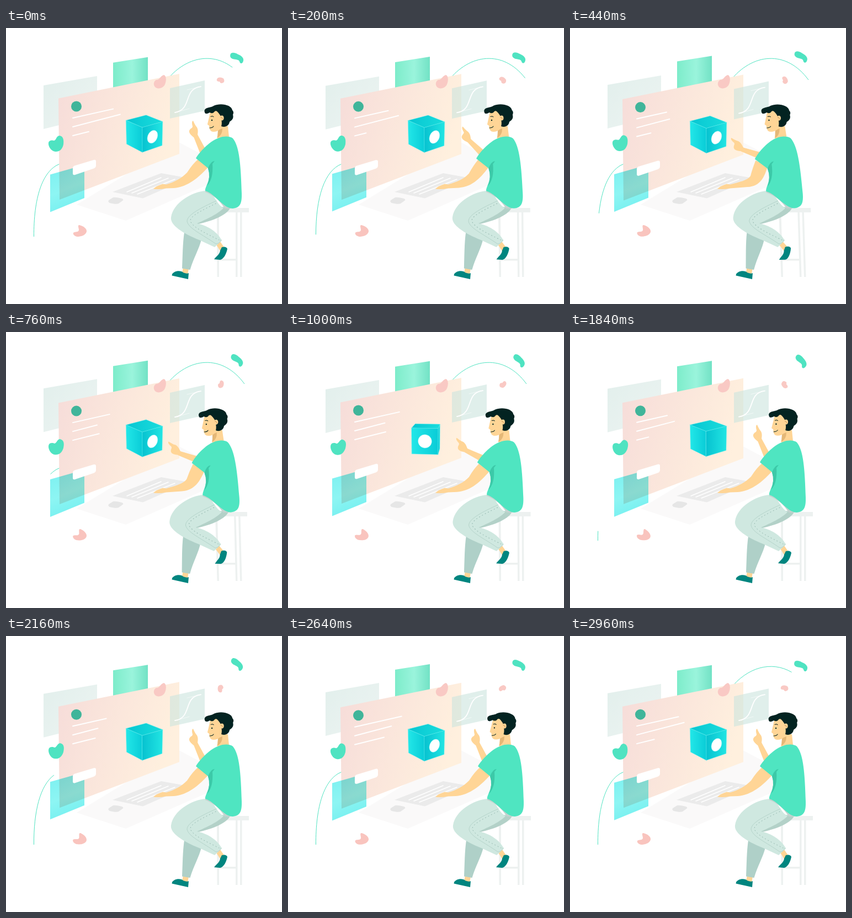
Animation, 500 px wide and 500 px high, one loop 3000 ms. Source, as an HTML page:

```html
<!DOCTYPE html>
<html lang="en">
<head>
<meta charset="utf-8">
<title>Pointing at a cube</title>
<style>
  html, body { margin: 0; height: 100%; overflow: hidden; background: #fff; }
  svg { display: block; width: 100vw; height: 100vh; }
</style>
</head>
<body>
<svg viewBox="0 0 500 500" fill="none" stroke-linecap="round" stroke-linejoin="round">
  <defs>
    <linearGradient id="gScreen" x2="1" y2=".3"><stop stop-color="#f6dcd9"/><stop offset="1" stop-color="#fff0de"/></linearGradient>
    <linearGradient id="gGreen"><stop stop-color="#7decca"/><stop offset=".55" stop-color="#9af4dc"/><stop offset="1" stop-color="#72e2c5"/></linearGradient>
    <linearGradient id="gPale" x2="1" y2="1"><stop stop-color="#e2efec"/><stop offset="1" stop-color="#edf4f2"/></linearGradient>
    <linearGradient id="gBlue" x2=".3" y2="1"><stop stop-color="#7af0f0"/><stop offset=".6" stop-color="#8df5f3"/><stop offset="1" stop-color="#78f0f0"/></linearGradient>
    <linearGradient id="gLeft"><stop stop-color="#22e7e8"/><stop offset="1" stop-color="#0accd7"/></linearGradient>
    <linearGradient id="gRight"><stop stop-color="#07c2d0"/><stop offset="1" stop-color="#22e5e3"/></linearGradient>
    <linearGradient id="gTop"><stop stop-color="#06c6d2"/><stop offset="1" stop-color="#1adcdc"/></linearGradient>
  </defs>

  <!-- desk -->
  <path fill="#faf9f9" d="M128 320 217 349 372 281V238L313 207Z"/>
  <path fill="#ebebeb" d="M193 297 281 263 331 272 248 308.500Z"/>
  <path stroke="#fff" stroke-width="1.500" d="M219 297 281 271M228 299 294 272M238 301 306 274"/>
  <path fill="#e6e6e6" d="M186 312 194 307Q198 306 210 309 214 311 211 313L204 318Q200 320 188 317 184 315 186 312Z"/>

  <path id="arcTop" pathLength="1" stroke="#4fe3c1" stroke-linecap="butt" d="M290 96C330 45 392 39 432 94"/>
  <path id="arcLeft" pathLength="1" stroke="#4fe3c1" stroke-linecap="butt" d="M50.500 378C50 310 65 258 98 246"/>

  <!-- floating panels -->
  <path id="pale" fill="url(#gPale)" d="M68 104 165 87V159L68 183Z"/>
  <path id="green" fill="url(#gGreen)" d="M194 62.500 257 52.500V112H194Z"/>
  <g id="screen">
    <path fill="url(#gScreen)" d="M95 127.500 314 83V228L97 311Z"/>
    <circle cx="127.500" cy="142" r="9.500" fill="#40b59a"/>
    <path id="lines" stroke="#fff" stroke-width="2"/>
  </g>
  <path id="blue" fill="url(#gBlue)" style="mix-blend-mode:multiply" d="M80 265.500 142 248V308L80 333.500Z"/>
  <path id="button" fill="#fff" d="M124 249.500 159 239Q163 238 163 242V249Q163 253 159 254.500L125 266Q121 267 121 263V254Q121 250.500 124 249.500Z"/>
  <g id="graph">
    <path fill="#cde5df" opacity=".62" d="M297 109 360 95V150L297 164Z"/>
    <path stroke="#fff" stroke-width="1.800" d="M306 153C338 148 320 110 353 106"/>
    <path stroke="#fff" stroke-width=".7" opacity=".8" d="M306 153 332 146M328 112 353 106"/>
  </g>
  <g id="cube" stroke="#63eeee" stroke-width=".5"></g>

  <!-- blobs -->
  <path fill="#f9c9c4" d="M286 85C291 87 291 97 287 104 283 110 274 111 270 107 266 102 268 96 272 94 279 94 279 87 286 85Z"/>
  <path id="bean" fill="#4fe3c1" d="M406.500 48C408 43 415 44.500 420 47.500 426 50 431 54 430 59 429 65.500 424 65.500 423 61 422 57 416 57.500 411 56 407 54 405.500 52 406.500 48Z"/>
  <path id="petal" fill="#f9c9c4" d="M382 93C383 88.500 390 88.500 394 91.500 397 96 395 100 390 100 387 99.500 388 97 386 97 383 97 381 95 382 93Z"/>
  <path id="heart" fill="#4fe3c1" d="M97 195C104 196 105 203 104 211 102 220 97 224 90 224 82 224 76 214 77 208 78 203 84 203 87 204 91 204 91 195 97 195Z"/>
  <path id="shell" fill="#f9c4be" d="M133 357C141 359 147 364 146 369 144 376 135 378 129 378 123 377 121 373 122 371 125 368 131 371 132 366 132 362 129 357 133 357Z"/>

  <!-- stool and legs -->
  <g id="lower">
    <path fill="#edf1f0" d="M382 326H440V334H427.500V451H424V334H419.500V451H416V421.500H386V451H382.500ZM386 334V418H416V334Z"/>
    <path fill="#ffd596" d="M321 434 331 436 329 447 319 444Z"/>
    <path fill="#afd0c8" d="M323 370 354 383C350 400 340 416 333.500 438L319 435.500C320 415 320 390 323 370Z"/>
    <g id="foot">
      <path fill="#ffd596" d="M380 391 388 387 395 397 388 404Z"/>
      <path fill="#00857f" d="M391 397Q399 395 401 400C399 410 394 419 388 420L377 419C381 413 387 411 388 403Z"/>
    </g>
    <path fill="#b3d1c8" d="M342 356C368 352 400 340 406 326L376 322Z"/>
    <path fill="#cfe8e0" d="M361 295C337 297 303 316 299 343 297 357 320 372 350 384L378 397 391 385C383 368 362 357 346 354 362 347 386 336 394 326 385 322 377 305 371 297Z"/>
    <path stroke="#a9cbc1" stroke-width=".7" d="M381 313C355 325 328 338 328 350 330 363 356 374 380 391 385 391 389 387 390 384"/>
    <path stroke="#8fb3aa" stroke-width="1" stroke-dasharray="1 5" d="M380 318C358 329 334 340 334 349 336 360 362 372 386 384"/>
  </g>
  <path fill="#00857f" d="M301 446C305 439 318 439 321 443Q328 446 331 444L330 455 300.500 448.500Z"/>

  <path id="restArm" fill="#ffd596"/>
  <g id="torso">
    <g id="raisedArm" fill="#ffd596">
      <path d="M339 195 347 193 366 228 356 238Z"/>
      <path id="hand" d="M339 168C341 172 343 177 346 180 349 186 347 191 347 195L340 198C335 194 331 190 332 186 334 181 338 182 338 178 337 174 336 169 339 168Z"/>
    </g>
    <path fill="#ffd596" d="M384 178H402L404 198Q393 205 382 199 385 192 384 178Z"/>
    <path fill="#e5b877" d="M384 185 392 182Q392 194 383 199Z"/>
    <g id="head">
      <path fill="#ffd596" d="M370 151C368 161 367 166 365 174 365 176 368 176 368 177 368 183 370 188 376 188 385 188 390 182 393 175L396 155 380 146Z"/>
      <path fill="#032321" d="M360 153C357 143 371 145 376 141 388 135 409 139 410 149 413 152 412 155 411 157 413 164 409 167 405 170 404 177 397 181 390 178 392 171 390 165 388 158 383 151 381 149 378 151 375 156 371 154 369 153 364 156 361 156 360 153Z"/>
      <ellipse cx="391" cy="163" rx="3.600" ry="4.500" fill="#ffd596"/>
      <path stroke="#b98546" stroke-width=".8" d="M389 162Q392 161 392 165"/>
      <circle cx="373" cy="167" r="1.200" fill="#032321"/>
      <path stroke="#032321" stroke-width="1" d="M371 160.500Q374 159 376 161M369 181Q374 181 376 178"/>
    </g>
    <path fill="#c3d3cf" d="M361 294 371 296 408 327 396 327Q384 306 361 297Z"/>
    <path fill="#4fe5c1" d="M386 199C394 195 407 196 411 200 423 214 425.500 250 427 300 427.500 318 424 326 410 327 393 326 380 301 361 295 360 288 370 278 368 262L366 254 344 236C352 222 372 203 386 199Z"/>
    <path fill="#3cc9a8" d="M366 254Q371 270 364 286 376 274 374 246L378 241Q371 241 366 254Z"/>
  </g>
</svg>
<script>
const LOOP = 3000, STEP = 40, TAU = 2 * Math.PI;
const el = id => document.getElementById(id);
const clamp = v => Math.min(1, Math.max(0, v));
const ease = v => v < .5 ? 2 * v * v : 1 - 2 * (1 - v) ** 2;
const span = (t, from, to) => clamp((t - from) / (to - from));
const wave = (t, period, peak) => Math.cos(TAU * (t - peak) / period);
const mix = (a, b, k) => a + (b - a) * k;
const move = (id, value) => el(id).setAttribute('transform', value);
const lift = (id, y) => move(id, `translate(0 ${y})`);
const spin = (id, deg, x, y, dy = 0) => move(id, `translate(0 ${dy}) rotate(${deg} ${x} ${y})`);

function trim(id, a, b) {
  el(id).setAttribute('visibility', b - a > .002 ? 'visible' : 'hidden');
  el(id).setAttribute('stroke-dasharray', `0 ${a} ${b - a} 2`);
}

function drawCube(t, dy) {
  const turns = [[760, 1240], [1500, 1820], [1820, 2140], [2200, 2620]].map(([a, b]) => span(t, a, b));
  const yaw = (39 - 90 * turns.reduce((sum, k) => sum + ease(k), 0)) * TAU / 360;
  const dip = Math.max(...turns.map(k => Math.sin(Math.PI * k)));
  const half = 23.2, sin = mix(.37, .2, dip), cos = Math.sqrt(1 - sin * sin);
  const cy = 190.2 + 3 * dip + dy;
  const project = (x, y, z) => {
    const k = 600 / (600 - z * cos - y * sin);
    return `${(250.5 + x * k).toFixed(2)},${(cy + (z * sin - y * cos) * k).toFixed(2)}`;
  };
  // point on the side whose normal points to azimuth a
  const onSide = (a, u, v) => project(
    half * Math.sin(a) + u * Math.cos(a), v, half * Math.cos(a) - u * Math.sin(a));
  const poly = (points, fill) => `<polygon points="${points.join(' ')}" fill="${fill}"/>`;
  const sides = [0, 1, 2, 3].map(i => yaw + i * TAU / 4);
  let out = poly(sides.map(a => onSide(a, half, half)), 'url(#gTop)');
  sides.forEach((a, i) => {
    if (Math.cos(a) < .045) return;
    const corners = [[-1, 1], [1, 1], [1, -1], [-1, -1]].map(([u, v]) => onSide(a, u * half, v * half));
    out += poly(corners, Math.sin(a) < 0 ? 'url(#gLeft)' : 'url(#gRight)');
    if (i) return;
    const disc = Array.from({ length: 40 }, (_, n) =>
      onSide(a, 12 * Math.cos(n * TAU / 40), 12 * Math.sin(n * TAU / 40)));
    out += poly(disc, '#fff');
  });
  el('cube').innerHTML = out;
}

function drawMan(t) {
  const lean = t < 1120 ? 1.1 * Math.sin(Math.PI * t / 1120) ** 2 : 0;
  const skew = Math.atan(.032 * lean) * 360 / TAU;
  const sway = `translate(0 451) skewX(${skew}) translate(0 -451)`;
  const reach = ease(span(t, 0, 420)) * (1 - ease(span(t, 900, 1300)));
  move('lower', sway);
  move('torso', `${sway} rotate(${-1.7 * lean} 395 322)`);
  spin('foot', -6 * lean, 388, 392);
  spin('head', 1.25 * (1 - wave(t, 1000, 50)), 390, 190);
  spin('raisedArm', -44 * reach, 362, 232);
  spin('hand', 12 * reach, 343, 196, -2 * reach);
  const p = (x0, y0, x1, y1) => `${mix(x0, x1, lean)} ${mix(y0, y1, lean)} `;
  el('restArm').setAttribute('d',
    'M' + p(368, 250, 358, 250) +
    'C' + p(350, 270, 353, 268) + p(330, 288, 346, 287) + p(304, 290, 322, 288) +
    'L290 290.5 Q278 293 267 291.500 Q272 286 284 282.500 L290 283.500 ' +
    'C' + p(306, 279, 306, 279) + p(318, 272, 322, 276) + p(328, 262, 327, 268) +
    'Q' + p(338, 246, 330, 256) + p(349, 237, 336, 240) + 'Z');
}

function draw(t) {
  const dy = .9 * (1 - wave(t, 1000, 50));
  lift('screen', dy);
  lift('button', dy);
  lift('graph', dy);
  lift('pale', 1.4 * wave(t, 1000, 160) - .7);
  lift('green', 1.1 * wave(t, 1000, 0) - .9);
  lift('blue', 1.4 * wave(t, 1000, 750));
  drawCube(t, dy);

  const ends = [190.5 + 15.5 * wave(t, 1500, 1180), 186 + 21 * wave(t, 1500, 0), 159 + 18 * wave(t, 1500, 1000)];
  el('lines').setAttribute('d', ends.map((x, i) =>
    `M121 ${163 + 16 * i}L${x} ${163 + 16 * i - (x - 121) * [.225, .262, .25][i]}`).join(''));

  const grow = span(t < 1000 ? t + LOOP : t, 2700, 3400);
  if (t < 1000 || t > 2700) trim('arcTop', 0, 1 - (1 - grow) ** 3);
  else trim('arcTop', ease(span(t, 1000, 1740)), 1);
  if (t < 1400) trim('arcLeft', ease(span(t, 100, 1000)), 1);
  else trim('arcLeft', 0, ease(span(t, 1700, 2280)));

  const swing = 1 - wave(t, LOOP, 0);
  const rise = wave(t, 1500, 0) - 1;
  spin('bean', 14 * swing - 1, 418, 55, 1.6 * rise);
  spin('petal', 360 * t / LOOP, 389, 95);
  spin('heart', 6 * swing, 91, 210, .8 * rise);
  spin('shell', 9 * swing, 134, 368);
  drawMan(t);
}

const start = performance.now();
function tick() {
  const t = (performance.now() - start) % LOOP;
  draw(Math.floor(t / STEP) * STEP);
  requestAnimationFrame(tick);
}
tick();
</script>
</body>
</html>
```
